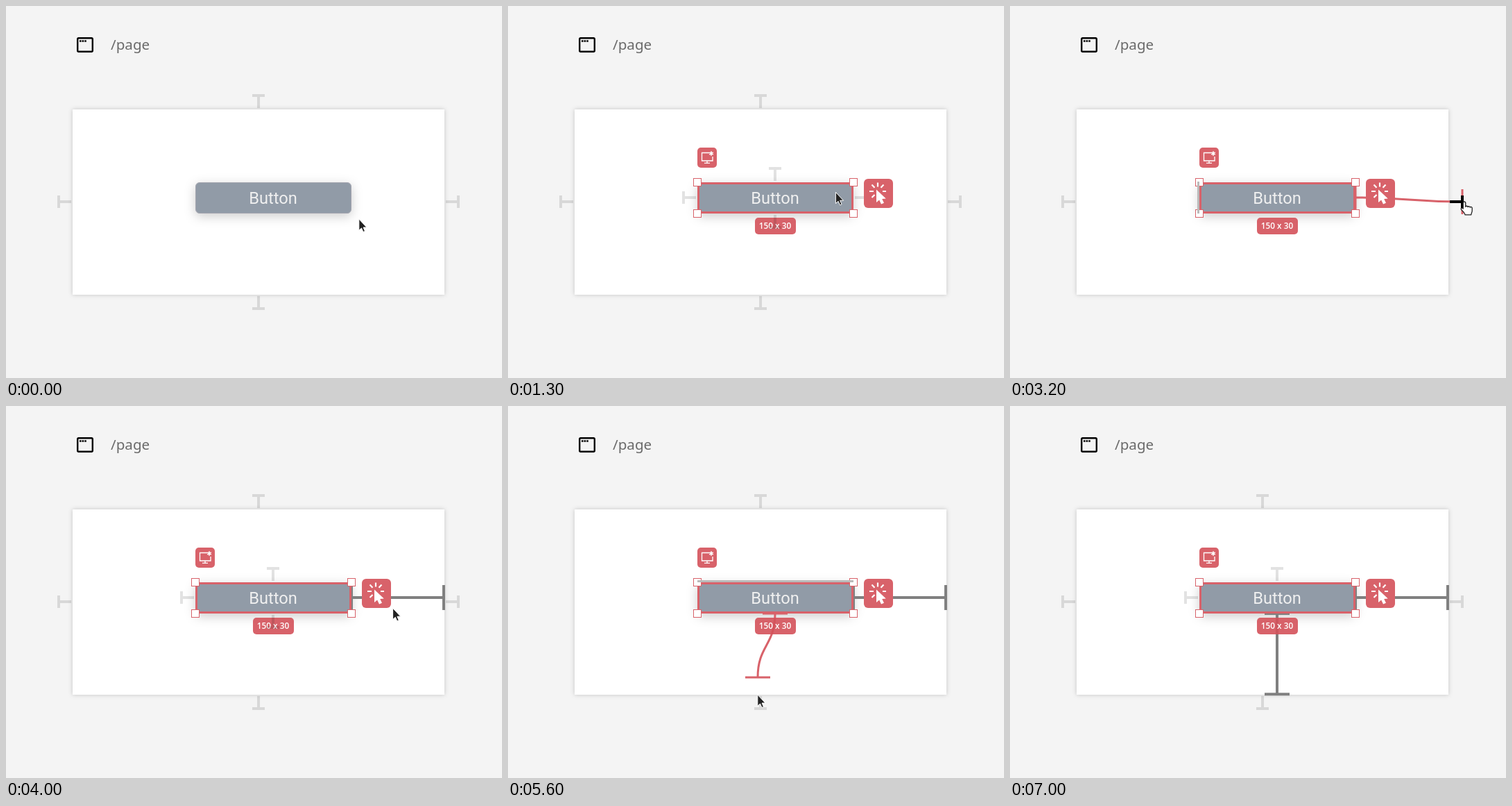
An HTML page that plays this animation: 715x536 px, repeating every 7.5 s.

```html
<!DOCTYPE html>
<html lang="en">
<head>
<meta charset="utf-8">
<title>Constraint handles</title>
<style>
  html, body { margin: 0; width: 100%; height: 100%; overflow: hidden; background: #f4f4f4; }
  svg { display: block; width: 100vw; height: 100vh; }
  .page { fill: #fff; filter: drop-shadow(0 0 3px rgba(0,0,0,.2)); }
  .button { fill: #919ba7; stroke: #a5a6b0; filter: drop-shadow(0 4px 8px rgba(0,0,0,.2)); }
  .handle { fill: none; stroke: rgba(0,0,0,.115); stroke-width: 4; }
  .hot { stroke: #000; }
  .red { fill: #d8626a; }
  .link { fill: none; stroke: #d8626a; stroke-width: 3; }
  .fixed { fill: none; stroke: #808080; stroke-width: 4; }
  .bar { fill: none; stroke: #bababa; stroke-width: 3; }
  .grip rect { fill: #fff; stroke: #d8626a; }
  .line { fill: none; stroke: #fff; }
  .path { font: 20.6px "Noto Sans", "Open Sans", sans-serif; fill: #6b6b6b; }
  .caption { font: 23.7px Roboto, sans-serif; fill: #f0f0f0; text-anchor: middle; }
  .size { font: 600 11.8px "Open Sans", "Noto Sans", sans-serif; fill: #fff; text-anchor: middle; }
</style>
</head>
<body>
<svg viewBox="0 0 715 536">
  <rect x="103.2" y="46.2" width="21.6" height="19.6" rx="1.5" fill="none" stroke="#000" stroke-width="2.4"/>
  <path d="M106 50.5h2.6m1 0h2.6m1 0h2.6" stroke="#000" stroke-width="2.4"/>
  <text class="path" x="151" y="63">/page</text>
  <rect class="page" x="96" y="149" width="536" height="267"/>
  <rect class="button" x="273.5" y="254.5" width="224" height="44" rx="5.5"/>
  <text class="caption" x="385" y="285">Button</text>

  <path id="fixedX" class="fixed" d="M498 258V294M498 276H631M631 258V294"/>
  <path id="fixedY" class="fixed" d="M367 299H403M385 299V415M367 415.3H403"/>
  <path id="link" class="link"/>

  <g id="select">
    <rect x="274.5" y="255.5" width="222" height="42" rx="3" fill="none" stroke="#d8626a" stroke-width="3"/>
    <rect class="red" x="273" y="204" width="28" height="29" rx="5"/>
    <g class="line" stroke-width="1.3">
      <path d="M290 211.5H279.5V223H295V217M287 223v3M283 226.3h8"/>
      <path d="M293 209.2v6.6M290.2 211l5.6 3M290.2 214l5.6-3" stroke-width="1.6"/>
    </g>
    <g class="grip" id="grips"></g>
    <rect x="356" y="305" width="59" height="24" rx="5" fill="#d4515a" fill-opacity=".9"/>
    <text class="size" x="385" y="321">150 x 30</text>
  </g>
  <path id="barX" class="bar" d="M271.5 253V299"/>
  <path id="barY" class="bar" d="M273 252.5H498"/>
  <g id="handles"></g>
  <g id="action">
    <rect class="red" x="513" y="249" width="42" height="42" rx="6"/>
    <path class="line" stroke-width="2.2" d="M533 254.5v6M524.5 257.5l4 4.2M521 267h6M524.5 276l4-4M541.5 257.5l-4 4.2M545 267h-5"/>
    <path fill="#fff" d="M531 264.5V283l4.2-3.4 2.8 6 4-1.9-2.8-5.7 5.6-.6Z"/>
  </g>
  <path id="hot" class="handle hot"/>
  <g id="arrow">
    <path fill="#222" stroke="#fff" d="M.3 0V16.3L4 13 6.4 18.5 9 17.4 6.6 12H11.5Z"/>
  </g>
  <g id="hand">
    <path fill="#fff" stroke="#222" stroke-width="1.2" stroke-linejoin="round" transform="translate(-1.2 -1) scale(1.1)"
      d="M4 10V2.5a1.6 1.6 0 0 1 3.2 0V7.5a1.6 1.6 0 0 1 3 .3 1.6 1.6 0 0 1 2.9.5 1.5 1.5 0 0 1 2.7 1V13c0 2-1.3 3-1.3 5H6.5c0-2-3-4.5-5-7-.9-1.6 1-2.6 2.5-1Z"/>
  </g>
</svg>
<script>
const LOOP = 7500, STEP = 100;
const HOVER = 300, SELECT = 900, LEAVE = 7000;
const DRAG_X = 2100, DROP_X = 3500, DRAG_Y = 5200, DROP_Y = 6500;
const T_SHAPE = 'M0 0V-16M-9 -18H9';

const $ = id => document.getElementById(id);
const show = (el, on) => el.setAttribute('visibility', on ? 'visible' : 'hidden');
const add = (parent, tag, attrs) => {
  const el = document.createElementNS('http://www.w3.org/2000/svg', tag);
  for (const k in attrs) el.setAttribute(k, attrs[k]);
  return parent.appendChild(el);
};

for (const x of [273, 498])
  for (const y of [254, 299])
    add($('grips'), 'rect', { x: x - 5.5, y: y - 5.5, width: 11, height: 11 });

// Cursor moves: from, until, x, y
const moves = [
  [200, 600, 447, 266],
  [1100, 1700, 502, 271],
  [2200, 2500, 594, 351],
  [2600, 3200, 650, 282],
  [3800, 4600, 385.5, 308.5],
  [4600, 4900, 381, 311],
  [5300, 5600, 359.5, 416],
  [5600, 6100, 358, 438],
  [6700, 6900, 261, 166]
];
const ease = p => 1 - (1 - p) ** 1.5;

function cursorAt(t) {
  let x = 508.5, y = 307;
  for (const [from, until, toX, toY] of moves) {
    if (t <= from) break;
    const p = ease(Math.min(1, (t - from) / (until - from)));
    x += (toX - x) * p;
    y += (toY - y) * p;
  }
  return { x, y };
}

// One T-shaped handle on each side of the page and of the button
const boxes = { page: [94, 147, 634, 418], button: [271, 252, 500, 301] };
const handles = Object.entries(boxes).flatMap(([owner, [l, t, r, b]]) => {
  const cx = Math.floor((l + r) / 2), cy = Math.floor((t + b) / 2);
  return [[cx, t], [r, cy], [cx, b], [l, cy]].map(([x, y], side) => {
    const dx = [0, 1, 0, -1][side], dy = [-1, 0, 1, 0][side];
    const place = `translate(${x} ${y}) rotate(${side * 90})`;
    const el = add($('handles'), 'path', { class: 'handle', d: T_SHAPE, transform: place });
    return { owner, side, place, el, mid: [x + 10 * dx, y + 10 * dy], cap: [x + 18 * dx, y + 18 * dy] };
  });
});
$('hot').setAttribute('d', T_SHAPE);

const dragging = t => t >= DRAG_X && t < DROP_X ? 'x' : t >= DRAG_Y && t < DROP_Y ? 'y' : '';

function isShown({ owner, side }, t) {
  const drag = dragging(t);
  if (owner === 'page') return !drag || (drag === 'x') === (side % 2 === 1);
  const used = side === 1 && t >= DRAG_X || side === 2 && t >= DRAG_Y;
  return t >= HOVER && !drag && !used;
}

function drawLink(axis, { x, y }, hot) {
  const free = axis === 'x' ? [x - 3, y + 5] : [x + .5, Math.max(300, y - 25)];
  const [ex, ey] = hot ? hot.cap : free;
  const mx = (498 + ex) / 2, my = (299 + ey) / 2;
  $('link').setAttribute('d', axis === 'x'
    ? `M498 258V294M498 276C${mx} 276 ${mx} ${ey} ${ex} ${ey}M${ex} ${ey - 18}v36`
    : `M367 299H403M385 299C385 ${my} ${ex} ${my} ${ex} ${ey}M${ex - 18} ${ey}h36`);
}

function draw(t) {
  const drag = dragging(t), at = cursorAt(t);
  for (const id of ['select', 'action']) show($(id), t >= SELECT);
  show($('barX'), drag === 'x');
  show($('barY'), drag === 'y');
  show($('fixedX'), t >= DROP_X);
  show($('fixedY'), t >= DROP_Y);

  const hot = t < LEAVE && handles.find(h => isShown(h, t) &&
    Math.hypot(at.x - h.mid[0], at.y - h.mid[1]) < 12);
  for (const h of handles) show(h.el, h !== hot && isShown(h, t));
  show($('hot'), !!hot);
  if (hot) $('hot').setAttribute('transform', hot.place);

  show($('link'), !!drag);
  if (drag) drawLink(drag, at, hot);

  show($('arrow'), t < LEAVE && !hot);
  show($('hand'), !!hot);
  for (const id of ['arrow', 'hand']) $(id).setAttribute('transform', `translate(${at.x} ${at.y})`);
}

const start = performance.now();
function tick() {
  const t = Math.max(0, performance.now() - start) % LOOP;
  draw(Math.floor(t / STEP) * STEP);
  requestAnimationFrame(tick);
}
tick();
</script>
</body>
</html>
```
